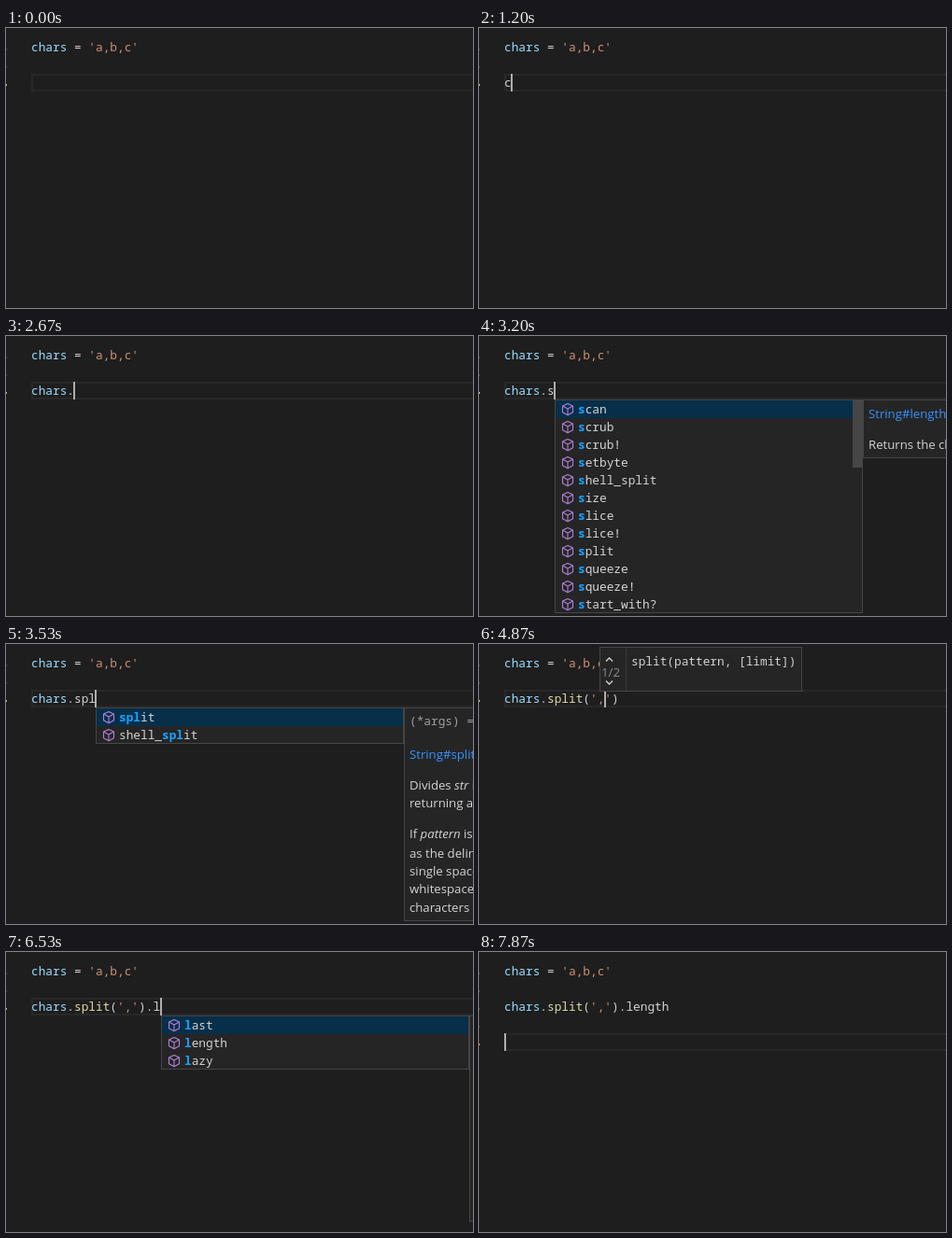
An HTML page that plays this animation: 500x300 px, repeating every 8 s.

```html
<!DOCTYPE html>
<html lang="en">
<head>
<meta charset="utf-8">
<title>Editor completion</title>
<style>
html, body { margin: 0; width: 100%; height: 100%; overflow: hidden; background: #1e1e1e; }
svg { display: block; width: 500px; height: 300px; }
text { white-space: pre; fill: #d4d4d4; }
.mono { font: 12.79px "Noto Sans Mono", "DejaVu Sans Mono", monospace; }
.sans { font: 13.2px "Open Sans", "Noto Sans", sans-serif; }
.var { fill: #9cdcfe; }
.fn { fill: #dcdcaa; }
.str { fill: #ce9178; }
.hit { fill: #18a3ff; font-weight: bold; }
.link { fill: #3794ff; }
.dim { fill: #a0a0a0; }
.box { fill: #252526; stroke: #454545; }
.icon { fill: none; stroke: #b180d7; stroke-width: 1.1; stroke-linejoin: round; }
.icon.value { stroke: #75beff; }
</style>
</head>
<body>
<svg id="stage" viewBox="0 0 500 300"></svg>
<script>
const LOOP = 8000, CHAR = 7.697, LEFT = 27, ROW = 19;
const stage = document.getElementById('stage');
const colX = col => LEFT + CHAR * col;

// Completion lists: names, typed prefix, scrollbar thumb top and height
const list = (names, query = '', thumb) => ({ names: names.split(' '), query, thumb });
const lists = {
  c: list('chars catch chdir_for_build check_parser_version caller callcc caller_locations chomp chop clone chmod_all class', 'c', [69, 110]),
  ch: list('chars chdir_for_build check_parser_version catch', 'ch'),
  string: list('length lines ljust lstrip lstrip! match next next! nil? oct ord partition', '', [152, 22]),
  s: list('scan scrub scrub! setbyte shell_split size slice slice! split squeeze squeeze! start_with?', 's', [69, 72]),
  sp: list('split shell_split strip strip! swapcase', 'sp'),
  spl: list('split shell_split', 'spl'),
  array: list('last lazy length map map! max max_by member? min min_by none? one?', '', [150, 22]),
  l: list('last length lazy', 'l'),
  le: list('length', 'le')
};

// Documentation panels: bottom edge, then [baseline, class, text]
const docs = {
  chars: [131, [87, 'mono dim', '=~ String'], [123, 'sans link', 'String']],
  length: [130, [88, 'sans link', 'String#length'], [121, 'sans', 'Returns the character length']],
  scan: [296, [87, 'mono dim', '(*args) => '], [123, 'sans link', 'String#scan'],
    [156, 'sans', 'Both forms iterate'], [175, 'sans', 'through the string']],
  split: [296, [87, 'mono dim', '(*args) => '], [123, 'sans link', 'String#split'],
    [156, 'sans', 'Divides <tspan font-style="italic">str</tspan> into'], [175, 'sans', 'returning an array'],
    [208, 'sans', 'If <tspan font-style="italic">pattern</tspan> is a'], [229, 'sans', 'as the delimiter'],
    [248, 'sans', 'single space'], [267, 'sans', 'whitespace and'], [287, 'sans', 'characters in']],
  last: [288, [87, 'mono dim', '(*args)'], [123, 'sans link', 'Array#last']]
};

const closed = { menu: null, doc: null };
// Each entry changes only the fields it names
const steps = [
  [0, { code: '', col: 0, line: 2, on: false, menu: null, doc: null, hint: null, pair: null }],
  [270, { on: true }],
  [730, { on: false }],
  [1200, { code: 'c', col: 1, on: true }],
  [1270, { menu: 'c', doc: 'chars' }],
  [1670, { on: false }],
  [1930, { code: 'ch', col: 2, on: true, menu: 'ch' }],
  [2130, { code: 'chars', col: 5, ...closed }],
  [2600, { on: false }],
  [2670, { code: 'chars.', col: 6, on: true }],
  [2730, { menu: 'string' }],
  [2800, { doc: 'length' }],
  [3200, { code: 'chars.s', col: 7, menu: 's' }],
  [3270, { doc: 'scan' }],
  [3330, { code: 'chars.sp', col: 8, menu: 'sp', doc: 'split' }],
  [3530, { code: 'chars.spl', col: 9, menu: 'spl' }],
  [3870, { code: 'chars.split', col: 11, ...closed }],
  [4330, { on: false }],
  [4400, { code: 'chars.split()', col: 12, on: true, pair: [11, 12] }],
  [4470, { hint: 12 }],
  [4600, { code: "chars.split('')", col: 13, pair: null }],
  [4670, { hint: 13 }],
  [4870, { code: "chars.split(',')", col: 14 }],
  [4930, { hint: 14 }],
  [5070, { col: 15, pair: [11, 15] }],
  [5130, { hint: 15 }],
  [5530, { on: false }],
  [5600, { col: 16, on: true, hint: 16 }],
  [5670, { hint: null }],
  [6000, { code: "chars.split(',').", col: 17, pair: null }],
  [6130, { menu: 'array' }],
  [6270, { doc: 'last' }],
  [6530, { code: "chars.split(',').l", col: 18, menu: 'l' }],
  [6670, { code: "chars.split(',').le", col: 19, menu: 'le', doc: null }],
  [7200, { on: false }],
  [7270, { code: "chars.split(',').length", col: 23, on: true, ...closed }],
  [7670, { line: 3, col: 0 }],
  [7870, { line: 4 }]
];

const span = (cls, s) => `<tspan class="${cls}">${s}</tspan>`;
const text = (x, y, cls, s) => `<text x="${x}" y="${y}" class="${cls}">${s}</text>`;
const rect = (x, y, w, h, fill) => `<rect x="${x}" y="${y}" width="${w}" height="${h}" fill="${fill}"/>`;
const box = (x, y, w, h) => `<rect class="box" x="${x + .5}" y="${y + .5}" width="${w - 1}" height="${h - 1}"/>`;

const paint = code => code
  .replace(/'[^']*'/g, s => `\u0001${s}\u0002`)
  .replace(/^chars(?=\.| =)/, s => span('var', s))
  .replace(/split(?=\()/, s => span('fn', s))
  .replace(/\u0001(.*?)\u0002/g, (_, s) => span('str', s));

// Prefix first, then start of a later word, then scattered letters
function mark(name, query) {
  if (!query) return name;
  const at = name.startsWith(query) ? 0 : name.indexOf('_' + query) + 1;
  if (at > 0 || name.startsWith(query)) {
    const end = at + query.length;
    return name.slice(0, at) + span('hit', name.slice(at, end)) + name.slice(end);
  }
  let i = 0;
  return [...name].map(c => c === query[i] ? (i++, span('hit', c)) : c).join('');
}

function icon(x, y, isValue) {
  const d = isValue
    ? 'M-4-4H-6.5V4H-4M4-4H6.5V4H4M-3.5-.5L1-2.5 3.5-1V1L-1 3-3.5 1.5ZM-3.5-.5L-1 .8 3.5-1M-1 .8V3'
    : 'M0-6L5.5-3.4V3.2L0 6.2-5.5 3.2V-3.4ZM-5.5-3.4L0-.6 5.5-3.4M0-.6V6.2';
  return `<path class="icon${isValue ? ' value' : ''}" transform="translate(${x} ${y})" d="${d}"/>`;
}

function menu(x, { names, query, thumb }) {
  let out = box(x, 68, 330, names.length * ROW + 1) + rect(x + 1, 69, 328, ROW, '#062f4a');
  names.forEach((name, i) => {
    const y = 69 + i * ROW;
    out += icon(x + 14, y + 9.5, name === 'chars') + text(x + 25, y + 14, 'mono', mark(name, query));
  });
  return thumb ? out + rect(x + 319, thumb[0], 10, thumb[1], '#464647') : out;
}

function doc(x, [bottom, ...rows]) {
  return box(x, 68, 300, bottom - 68 + 1) + rows.map(([y, cls, s]) => text(x + 6, y, cls, s)).join('');
}

function hint(x) {
  const arrow = (y, dy) => `<path d="M${x + 7} ${y}l3.5 ${dy} 3.5 ${-dy}" fill="none" stroke="#d4d4d4" stroke-width="1.3"/>`;
  return box(x, 3, 217, 48) + rect(x + 28, 4, 1, 46, '#39393a') +
    arrow(18.5, -3.5) + arrow(39.5, 3.5) +
    text(x + 2, 35, 'sans" style="fill:#8c8c8c', '1/2') +
    text(x + 34, 23, 'mono', 'split(pattern, [limit])');
}

function draw(s) {
  const top = 11 + s.line * ROW;
  let out = `<rect x="28" y="${top + 1}" width="480" height="17" fill="none" stroke="#282828" stroke-width="2"/>`;
  for (let i = 0; i <= s.line; i++) {
    const active = s.line === 4 ? '#c98a22' : '#b8b890';
    out += rect(0, 22 + i * ROW, 1, 2, i === s.line ? active : '#404040');
  }
  for (const col of s.pair || [])
    out += `<rect x="${Math.round(colX(col)) + .5}" y="49.5" width="7" height="18" fill="#006400" fill-opacity=".1" stroke="#888"/>`;
  out += text(LEFT, 25, 'mono', paint("chars = 'a,b,c'")) + text(LEFT, 63, 'mono', paint(s.code));
  if (s.on) out += rect(Math.max(LEFT, Math.floor(colX(s.col) - .5)), top, 2, ROW, '#aeafad');
  const x = Math.round(colX(s.col));
  if (s.doc) out += doc(x + 330, docs[s.doc]);
  if (s.menu) out += menu(x, lists[s.menu]);
  if (s.hint) out += hint(Math.round(colX(s.hint)) + 2);
  stage.innerHTML = out;
}

let state = {};
const states = steps.map(([at, change]) => [at, state = { ...state, ...change }]);
const start = performance.now();
let shown = null;

function render(t) {
  let now = states[0][1];
  for (const [at, s] of states) if (at <= t) now = s;
  if (now !== shown) draw(shown = now);
}

function tick() {
  render((performance.now() - start) % LOOP);
  requestAnimationFrame(tick);
}
tick();
</script>
</body>
</html>
```
